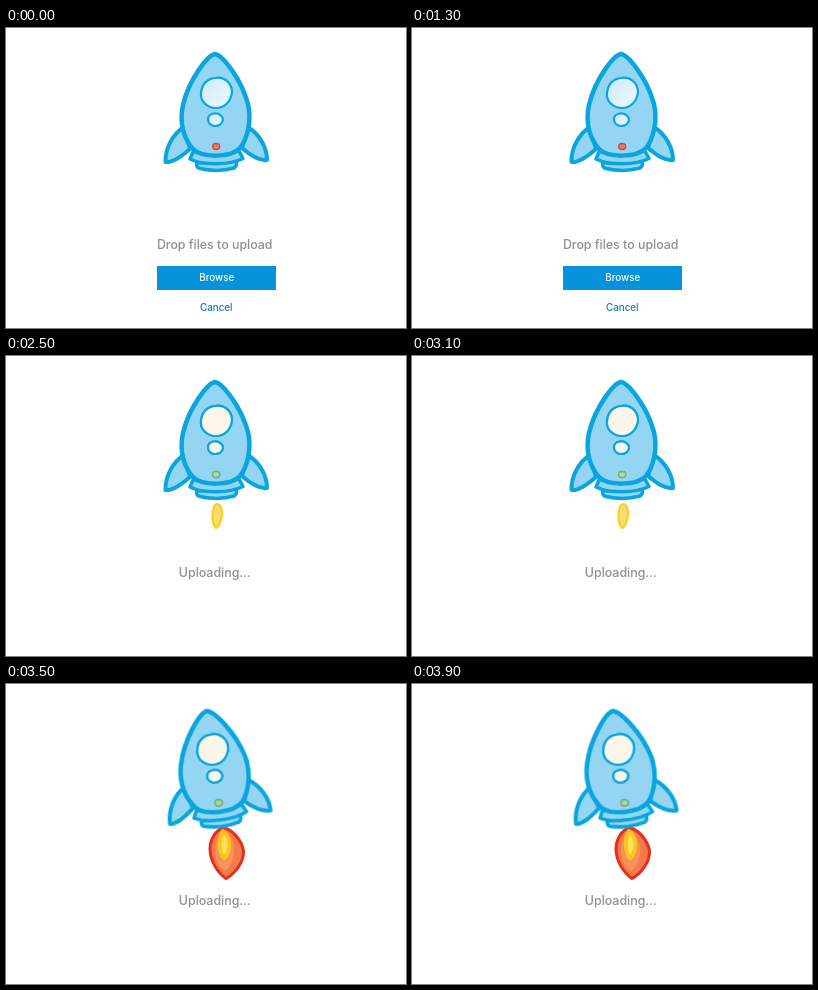
Write an HTML page that moves like this. It is 400x300 px and loops after 4 s.

```html
<!DOCTYPE html>
<html lang="en">
<head>
<meta charset="utf-8">
<title>Rocket upload</title>
<style>
  html, body { margin: 0; width: 100%; height: 100%; overflow: hidden; background: #fdfefd; }
  svg { display: block; width: 100vw; height: 100vh; }
  text { font-family: Inter, "Open Sans", sans-serif; font-weight: 500; text-anchor: middle; }
  .label { font-size: 12.4px; fill: #8c9094; }
  .small { font-size: 9.8px; }
  .skin { fill: #95d5f4; stroke: #08a5de; stroke-width: 4; stroke-linejoin: round; }
  .glass { stroke: #08a5de; stroke-width: 2.2; }
  #lit, #loading, #spark, #blaze { opacity: 0; }
  #spark { transform-origin: 211px 147px; }
  #rocket { transform-origin: 209px 92px; }
</style>
</head>
<body>
<svg viewBox="0 0 400 300">
  <defs>
    <linearGradient id="pane" x1="0" y1="0" x2="1" y2="1">
      <stop offset="0" stop-color="#cdebf9"/>
      <stop offset="1" stop-color="#eef9fd"/>
    </linearGradient>
    <path id="big" d="M209 50C218 48 226 55 226 64C225 74 218 80 210 80C201 80 194 73 195 65C196 56 201 51 209 50Z"/>
    <path id="mid" d="M208 85.5C213 85 217 88 217 92C216 96 213 98 209 98C205 98 202 95 202 91.500C202 88 204 86 208 85.500Z"/>
    <ellipse id="dot" cx="210.200" cy="118.500" rx="3.500" ry="3"/>
  </defs>

  <g id="spark">
    <path d="M211 148C215 149 217 154 216 160C215 167 212 172 210 172C207 169 206 163 206.500 158C207 152 208 148 211 148Z"
          fill="#fbdc70" stroke="#f5d21c" stroke-width="2"/>
  </g>
  <g id="blaze">
    <path d="M217 144C225 144 236 156 237.500 167C238 179 228 190 220 194.500C212 189 204 177 204 165C204 155 210 146 217 144Z"
          fill="#f47a4c" stroke="#e4301f" stroke-width="3" stroke-linejoin="round"/>
    <path d="M216 147C209 154 207 169 212 180C214 183 217 186 219 187C224 184 229 175 228 164C227 154 222 148 216 147Z" fill="#f6925c"/>
    <path d="M217 145C222 147 226 155 225 164C224 171 221 175 218 177C213 172 211 164 212 156C213 150 214 146 217 145Z" fill="#fbc51e"/>
    <path d="M218 150C221 153 222 160 221 165C220 168 219 170 218 171C215 166 215 156 218 150Z" fill="#fde257"/>
  </g>

  <g id="rocket">
    <g class="skin">
      <path d="M178 99C167 106 159 120 159.500 134C166 135 176 128 184 121Z"/>
      <path d="M242 99C253 106 261 119 261 132C254 133 244 127 236 120Z"/>
      <path d="M191 135C190 138 191 140 194 140.500C205 143 217 143 228 140C231 138 231 136 230 133Z" stroke-width="3.500"/>
      <path d="M187 124L184 131C197 137.500 223 137.500 237 130.500L233 123Z" stroke-width="3.500"/>
      <path d="M209 26C216 27 235 50 242 76C246 94 241 111 234 120C225 130 196 130 187 121C178 111 173 95 177 77C183 51 202 27 209 26Z" stroke-width="4.500"/>
    </g>
    <g class="glass" fill="url(#pane)">
      <use href="#big"/><use href="#mid"/>
    </g>
    <use href="#dot" fill="#f4775f" stroke="#d2463b" stroke-width="1.300"/>
    <g id="lit">
      <g class="glass" fill="#fdf6ea">
        <use href="#big"/><use href="#mid"/>
      </g>
      <use href="#dot" fill="#94e2c0" stroke="#72bd62" stroke-width="1.300"/>
    </g>
  </g>

  <g id="prompt">
    <text class="label" x="208.700" y="221">Drop files to upload</text>
    <rect x="151" y="238" width="119" height="24" fill="#0693dc"/>
    <text class="small" x="210.800" y="253.400" fill="#fff">Browse</text>
    <text class="small" x="210.300" y="283.200" fill="#1d74b6">Cancel</text>
  </g>
  <text id="loading" class="label" x="208.700" y="221">Uploading...</text>
</svg>
<script>
  const LOOP = 4000;
  const FADE = [1850, 2450];
  // Times at which the rocket swaps between upright and leaning
  const SWAPS = [3300, 3600, 3900];

  // steps: [ms, style, easing]
  function play(id, steps) {
    const frames = steps.map(([ms, style, easing = "linear"]) =>
      ({ ...style, offset: ms / LOOP, easing }));
    const anim = document.getElementById(id)
      .animate(frames, { duration: LOOP, iterations: Infinity });
    anim.startTime = document.timeline.currentTime;
  }

  const fade = (from, to) => [
    [0, from], [FADE[0], from, "ease-in-out"], [FADE[1], to], [LOOP, to]
  ];

  const swap = (rest, lean) => [
    [0, rest, "step-end"],
    ...SWAPS.map((ms, i) => [ms, i % 2 ? rest : lean, "step-end"]),
    [LOOP, lean]
  ];

  const hidden = { opacity: 0 }, shown = { opacity: 1 };

  play("prompt", fade(shown, hidden));
  play("loading", fade(hidden, shown));
  play("lit", fade(hidden, shown));

  play("spark", [
    [0, { opacity: 0, transform: "scale(0.3)" }],
    [FADE[0], { opacity: 0, transform: "scale(0.3)" }, "ease-out"],
    [FADE[1], { opacity: 1, transform: "none" }, "step-end"],
    ...SWAPS.map((ms, i) => [ms, { opacity: i % 2, transform: "none" }, "step-end"]),
    [LOOP, { opacity: 0, transform: "none" }]
  ]);

  play("blaze", swap(hidden, shown));
  play("rocket", swap(
    { transform: "translate(0px, 0px) rotate(0deg)" },
    { transform: "translate(-0.6px, 0.6px) rotate(-6.6deg)" }
  ));
</script>
</body>
</html>
```
